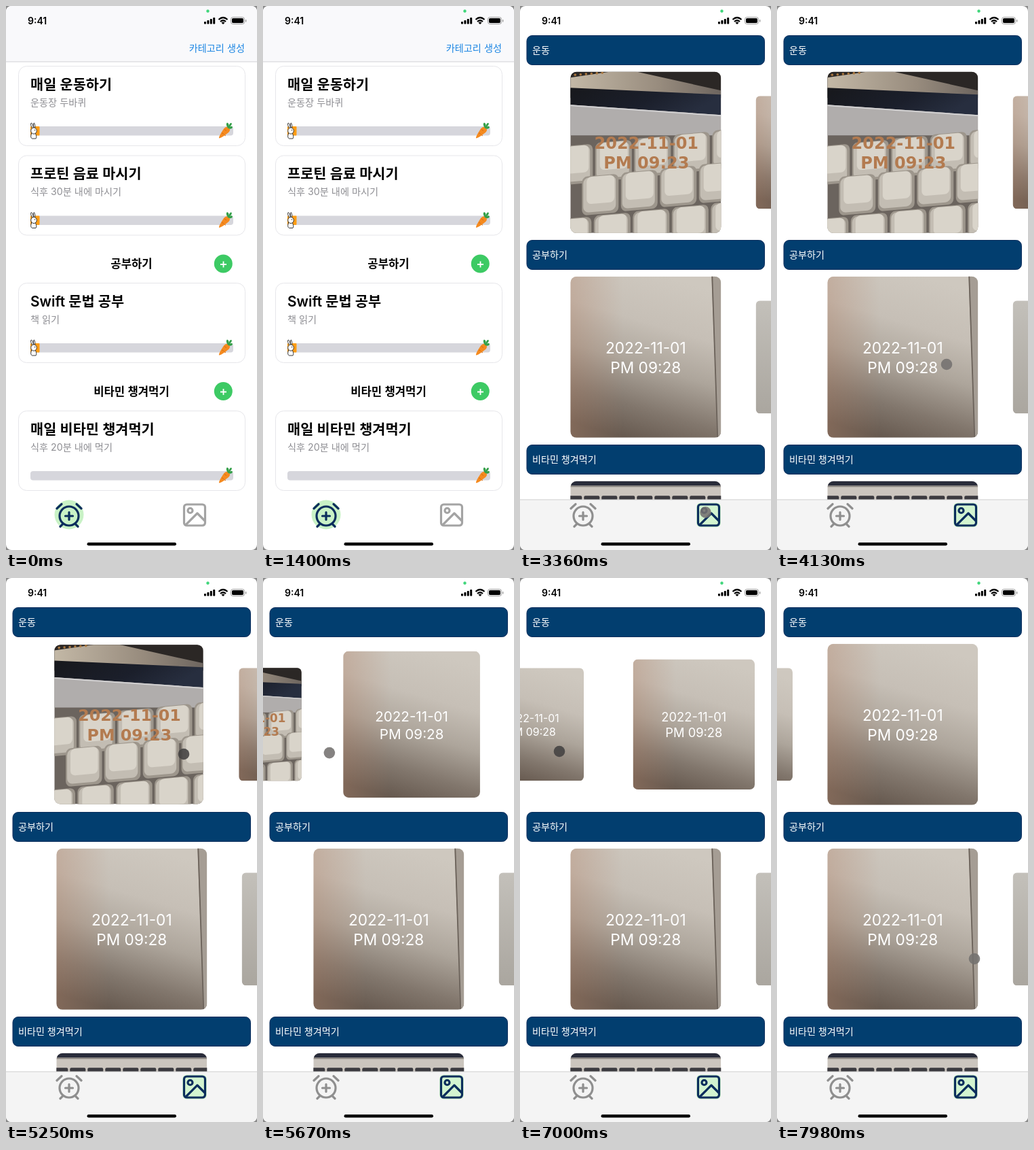
An HTML page for the animation above (8 s loop, 370x800 px).

```html
<!DOCTYPE html>
<html lang="ko">
<head>
<meta charset="utf-8">
<style>
  html, body { margin: 0; width: 100%; height: 100%; overflow: hidden; background: #8c8c8c; }
  svg { display: block; font-family: Inter, "Noto Sans CJK KR", "Noto Sans CJK", sans-serif; }
  .title { font-size: 20.8px; font-weight: 600; }
  .note { font-size: 14.2px; fill: #8e8e93; }
  .section { font-size: 16.7px; font-weight: 600; text-anchor: middle; }
  .label { font-size: 14.1px; fill: #fff; }
  .stamp { font: 22.7px Inter, sans-serif; fill: #fff; text-anchor: middle; }
  .bold { font: bold 24px "DejaVu Sans", sans-serif; fill: #b37b50; }
  .icon { fill: none; stroke-width: 3.2; stroke-linecap: round; stroke-linejoin: round; }
</style>
</head>
<body>
<svg id="stage" width="370" height="800" viewBox="0 0 370 800">
  <defs>
    <clipPath id="photo"><rect x="-111" y="-118.5" width="222" height="237" rx="9"/></clipPath>
    <linearGradient id="metal" x1=".64" x2=".36" y2="1">
      <stop stop-color="#cec8bf"/><stop offset=".3" stop-color="#c6bfb6"/>
      <stop offset=".55" stop-color="#ada59b"/><stop offset=".8" stop-color="#82776d"/>
      <stop offset="1" stop-color="#66594f"/>
    </linearGradient>
    <linearGradient id="warm">
      <stop stop-color="#b5866c" stop-opacity=".35"/><stop offset=".35" stop-color="#b5866c" stop-opacity="0"/>
    </linearGradient>
    <linearGradient id="silver" x2="0" y2="1">
      <stop stop-color="#c3c0ba"/><stop offset="1" stop-color="#aaa69f"/>
    </linearGradient>
    <linearGradient id="dark" x2="1" y2=".3">
      <stop stop-color="#17181c"/><stop offset=".6" stop-color="#1b1f2b"/><stop offset="1" stop-color="#272e3f"/>
    </linearGradient>
    <linearGradient id="tan">
      <stop stop-color="#c3b8a6"/><stop offset=".6" stop-color="#978b7d"/><stop offset="1" stop-color="#6d655f"/>
    </linearGradient>
  </defs>
</svg>
<script>
const LOOP = 8000, STEP = 70, NAVY = '#0b2d5c', GLOW = '#c9f2c6';
const CENTER = 185.3, SPACING = 240, HALF = 111;
const stage = document.getElementById('stage');

const text = (x, y, cls, str) => `<text x="${x}" y="${y}" class="${cls}">${str}</text>`;
const rect = (x, y, w, h, fill, rx = 0, more = '') =>
  `<rect x="${x}" y="${y}" width="${w}" height="${h}" rx="${rx}" fill="${fill}" ${more}/>`;
const path = (d, fill, more = '') => `<path d="${d}" fill="${fill}" ${more}/>`;
const circle = (x, y, r, fill) => `<circle cx="${x}" cy="${y}" r="${r}" fill="${fill}"/>`;
const repeat = (n, fn) => Array.from({ length: n }, (_, i) => fn(i)).join('');

// Goal list
const rabbit = rect(36, 88.5, 13.5, 13.5, '#ff9d14', 1) +
  `<g fill="#fff" stroke="#222" stroke-width=".9">
    <path d="M38.5 91Q35 84 37.5 83.5Q40 85 40.5 91M41 91Q39.5 84 41.5 83.5Q43.5 86 42.5 92"/>
    <path d="M38 98Q35 105 38.5 106.5H44Q46 104 43 98Z"/>
    <ellipse cx="41" cy="95" rx="4.3" ry="4.6"/>
  </g>` + circle(42.5, 94, .7, '#222');

const carrot = path('M314 106Q313 104 321 92Q325 87 329 91Q332 95 326 99Q317 106 314 106Z', '#f58a1f') +
  path('M318 98l3 2M322 93l3 2M322 101l2 1.5', 'none', 'stroke="#d66d12"') +
  path('M327 91Q323 85 326 83Q329 84 328.5 88Q330 82 333 84Q333 87 330 89Q334 87 334 90Q332 94 327 91Z', '#35a04a');

const goal = (y, title, note, started = true) => `<g transform="translate(0 ${y})">
  ${rect(18.5, 0, 334, 117, '#fff', 12, 'stroke="#e6e6ea"')}
  ${text(36, 34, 'title', title)}${text(36, 58, 'note', note)}
  ${rect(36, 88.5, 299, 13.5, '#d6d6dc', 4)}${started ? rabbit : ''}${carrot}</g>`;

const section = (y, name) => text(185, y + 6, 'section', name) + circle(320.3, y, 13.5, '#3dca64') +
  path(`M316 ${y + 1}h9m-4.5 -4.5v9`, 'none', 'stroke="#fff" stroke-width="1.8"');

// Tab icons
const alarm = color => path('M75 739l7-6.5M111 739l-7-6.5M80 765.5l4-4M106 765.5l-4-4M87.5 750h11M93 744.5v11', 'none',
  `class="icon" stroke="${color}"`) + `<circle cx="93" cy="750" r="14" class="icon" stroke="${color}"/>`;
const picture = color => `<g class="icon" stroke="${color}">
  <rect x="262.5" y="733" width="31" height="31" rx="4"/><circle cx="271.5" cy="742" r="3.5"/>
  <path d="M265 763l17-17 11 11"/></g>`;

const listScreen = goal(88.5, '매일 운동하기', '운동장 두바퀴') +
  goal(220, '프로틴 음료 마시기', '식후 30분 내에 마시기') + section(379, '공부하기') +
  goal(407.5, 'Swift 문법 공부', '책 읽기') + section(566.5, '비타민 챙겨먹기') +
  goal(595.5, '매일 비타민 챙겨먹기', '식후 20분 내에 먹기', false) +
  rect(0, 0, 370, 82, '#f9f9fb') + rect(0, 81.5, 370, 1, '#d2d2d6') +
  `<text x="352" y="67" font-size="14.2" fill="#1c86e3" text-anchor="end">카테고리 생성</text>` +
  circle(93, 748, 21.5, GLOW) + alarm(NAVY) + picture('#a3a3a3');

// Photos, drawn around their own centre
const fill = paint => rect(-111, -118.5, 222, 237, paint);
const stamp = (minute, cls = '') =>
  text(0, -5, 'stamp ' + cls, '2022-11-01') + text(0, 23.7, 'stamp ' + cls, 'PM 09:' + minute);
const metal = fill('url(#metal)') + fill('url(#warm)');
const metalStamped = metal + stamp(28);
const edged = metal + path('M97 -119H111V119H106Z', '#a59d94') +
  path('M98 -119L106 118', 'none', 'stroke="#6b625a" stroke-width="1.8"') + stamp(28);

const keycap = (x, y) => `<g transform="translate(${x} ${y}) skewY(-5)">
  ${rect(0, 0, 54, 57, '#9d968c', 8)}${rect(2, 2, 48, 51, '#c3bdb3', 8)}${rect(7, 1, 41, 40, '#d9d4ca', 7)}</g>`;
const keyRow = (x, y) => repeat(5, i => keycap(x + i * 57.5, y - i * 6));
const keyboard = fill('#6b645e') +
  path('M-111 -119H111V-80H-111Z', '#2b2725') +
  path('M-111 -110L-50 -119H-15L111 -91V-84L-111 -94Z', 'url(#tan)') +
  repeat(6, i => circle(-104 + i * 8, -114 - i * .6, 1.8, '#a9773f')) +
  path('M-111 -95L111 -85V-55L-111 -70Z', 'url(#dark)') +
  path('M-111 -70L111 -55V-25H-111Z', '#b0adac') +
  path('M-111 -69L111 -54', 'none', 'stroke="#d0cfd0" stroke-width="2"') +
  keyRow(-132, -8) + keyRow(-94, 36) + keyRow(-134, 99) +
  `<g transform="translate(1)">${stamp(23, 'bold')}</g>`;

const laptop = fill('#cbc5be') + rect(-111, -119, 222, 7, '#292c3a') + rect(-111, -112, 222, 2, '#85807c') +
  repeat(9, i => rect(-117 + i * 26, -97, 23, 15, '#3b3a3f', 2));

const rows = [
  { name: '운동', photos: [keyboard, metalStamped, metalStamped] },
  { name: '공부하기', photos: [edged, fill('url(#silver)')] },
  { name: '비타민 챙겨먹기', photos: [laptop] }
];
const galleryScreen = rows.map((row, r) => {
  const y = 43 + r * 301;
  return rect(10, y + .5, 350.5, 43, '#023e6f', 8, `stroke="${NAVY}"`) + text(18, y + 27, 'label', row.name) +
    row.photos.map(p => `<g class="photo${r}" clip-path="url(#photo)">${p}</g>`).join('');
}).join('') + rect(0, 726, 370, 74, '#f4f4f4') + rect(0, 725.5, 370, 1, '#d0d0d0') +
  alarm('#8f8f8f') + rect(260, 730.5, 36, 36, '#d3f4d0', 6) + picture(NAVY);

const statusBar = `<text x="32" y="27" font-size="14" font-weight="600">9:41</text>` + circle(297.5, 7.5, 2.2, '#3fd67a') +
  repeat(4, i => rect(292 + i * 4.4, 23 - i * 2, 3, 3.5 + i * 2, '#000', .8)) +
  path('M313.5 20Q320 14 326.5 20M316 23Q320 19.5 324 23', 'none', 'stroke="#000" stroke-width="2.2"') +
  path('M317.5 24.5Q320 22.5 322.5 24.5L320 27Z', '#000') +
  rect(331.5, 16.5, 20, 10, 'none', 3, 'stroke="#999"') + rect(333, 18, 17, 7, '#000', 1.7) + rect(353, 20, 1.3, 3.5, '#999', .6);

stage.insertAdjacentHTML('beforeend', rect(0, 0, 370, 800, '#fff', 8) +
  `<clipPath id="screen">${rect(0, 0, 370, 800, '#fff', 8)}</clipPath><g clip-path="url(#screen)">
  <g id="list">${listScreen}</g><g id="gallery">${galleryScreen}</g>${statusBar}
  ${rect(119.5, 789, 131.5, 4.5, '#000', 2.25)}<circle id="touch" r="8.3" fill-opacity=".88"/></g>`);

// Motion: [time, values..., easing into this key]
const linear = u => u, smooth = u => u * u * (3 - 2 * u), out = u => 1 - (1 - u) ** 3;
const pointerKeys = [
  [2100, 385, 700, linear], [2660, 256, 746, out], [2870, 274, 749, smooth], [3290, 274, 749, linear],
  [4130, 250, 527, smooth], [4900, 268, 262, smooth], [5180, 266, 259, linear], [5250, 262, 259, linear],
  [5600, 92, 257, linear], [6160, 229, 259, smooth], [6580, 228, 259, linear], [7000, 58, 255, smooth],
  [7070, 40, 256, linear], [7980, 291, 560, smooth]
];
const scrollKeys = [
  [5180, 0, linear], [5250, 4.3, linear], [5600, 174, linear], [5950, 240, out],
  [6580, 240, linear], [7000, 409, smooth], [7070, 427, linear], [7420, 480, out]
];
const presses = [[2870, 3010], [5110, 5600], [6510, 7070]];

function sample(keys, t) {
  const i = keys.findIndex(k => k[0] > t);
  if (i === 0) return keys[0].slice(1, -1);
  if (i < 0) return keys.at(-1).slice(1, -1);
  const a = keys[i - 1], b = keys[i], u = b.at(-1)((t - a[0]) / (b[0] - a[0]));
  return a.slice(1, -1).map((v, n) => v + (b[n + 1] - v) * u);
}

const $ = id => document.getElementById(id);
const photoRows = rows.map((_, r) => [...document.querySelectorAll('.photo' + r)]);

function placeRow(r, scroll) {
  photoRows[r].forEach((photo, i) => {
    const offset = i * SPACING - scroll;
    const scale = 1 - .3 * Math.min(Math.abs(offset) / HALF, 1);
    photo.setAttribute('transform', `translate(${CENTER + offset} ${215.3 + r * 301}) scale(${scale})`);
  });
}

function draw(t) {
  const inGallery = t >= 3010;
  $('list').style.display = inGallery ? 'none' : '';
  $('gallery').style.display = inGallery ? '' : 'none';
  placeRow(0, sample(scrollKeys, t)[0]);
  const [x, y] = sample(pointerKeys, t);
  const pressed = presses.some(([from, to]) => t >= from && t < to);
  $('touch').setAttribute('transform', `translate(${x} ${y})`);
  $('touch').setAttribute('fill', pressed ? '#434141' : '#74716f');
}

placeRow(1, 0);
placeRow(2, 0);
const start = performance.now();
function tick() {
  const t = (performance.now() - start) % LOOP;
  draw(Math.floor(t / STEP) * STEP);
  requestAnimationFrame(tick);
}
tick();
</script>
</body>
</html>
```
